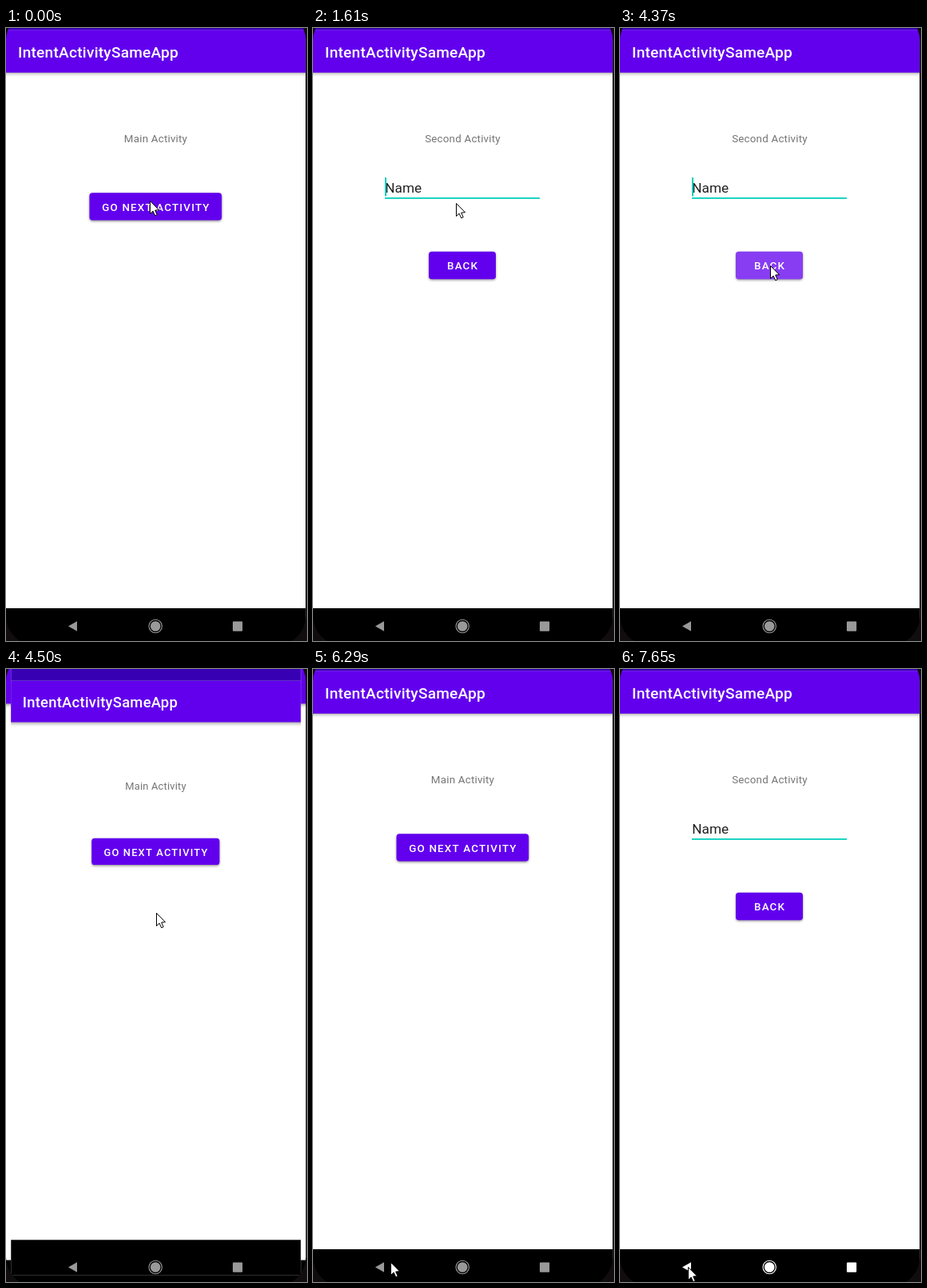
Animation, 377 px wide and 767 px high, one loop 8000 ms. Source, as an HTML page with a canvas:

```html
<!DOCTYPE html>
<html lang="en">
<head>
<meta charset="utf-8">
<title>Activity switch</title>
<style>
html, body { margin: 0; width: 100%; height: 100%; overflow: hidden; background: #000; }
canvas { display: block; }
</style>
</head>
<body>
<canvas id="stage" width="377" height="767"></canvas>
<script>
const ctx = document.getElementById('stage').getContext('2d');
const LOOP = 8000;
const PURPLE = '#6200ee';
const W = 375.5, TOP = -20.5, H = 792.5, CX = 187.4, CY = TOP + H / 2;

const MAIN = { label: 'Main Activity', button: { x: 104.5, y: 206.2, w: 165.7, text: 'GO NEXT ACTIVITY' } };
const SECOND = { label: 'Second Activity', field: true, button: { x: 145, y: 279.8, w: 84, text: 'BACK' } };

const PRESSES = [
  { screen: MAIN, start: 655, end: 1090, x: 180, y: 217 },
  { screen: SECOND, start: 3955, end: 4400, x: 188, y: 297 }
];
const SWITCHES = [
  { start: 1090, from: MAIN, to: SECOND },
  { start: 4400, from: SECOND, to: MAIN },
  { start: 7130, from: MAIN, to: SECOND, closing: true }
];

// time, x, y, eased
const POINTER = [
  [0, 180, 216], [199, 180, 216], [200, 180, 217], [1410, 180, 217], [1610, 179, 219],
  [2240, 182, 264], [3010, 188, 297], [4380, 188, 297], [4710, 187, 324, 1],
  [4915, 176, 313, 1], [5520, 176, 313], [6285, 97, 742, 1], [6360, 97, 742],
  [6625, 84, 744, 1], [6870, 84, 744], [6960, 85, 748, 1], [LOOP, 85, 748]
];

const clamp = v => Math.max(0, Math.min(1, v));
const ramp = (t, start, length) => clamp((t - start) / length);
const mix = (a, b, k) => a + (b - a) * k;
const smooth = k => k * k * (3 - 2 * k);

function cubic(p0, p1, p2, p3, u) {
  const v = 1 - u;
  return v * v * v * p0 + 3 * v * v * u * p1 + 3 * v * u * u * p2 + u * u * u * p3;
}

// Quick start with a very long settle
function settle(x) {
  const early = x < 1 / 6;
  const xs = early ? [0, 0.05, 0.1333, 1 / 6] : [1 / 6, 0.2083, 0.25, 1];
  const ys = early ? [0, 0, 0.06, 0.4] : [0.4, 0.82, 1, 1];
  let lo = 0, hi = 1;
  for (let i = 0; i < 24; i++) {
    const mid = (lo + hi) / 2;
    if (cubic(...xs, mid) < x) lo = mid; else hi = mid;
  }
  return cubic(...ys, lo);
}

function shadow(alpha, blur, dy) {
  ctx.shadowColor = `rgba(0,0,0,${alpha})`;
  ctx.shadowBlur = blur;
  ctx.shadowOffsetY = dy;
}

function text(str, x, y, size, color, weight = 400, spacing = 0, align = 'left') {
  ctx.font = `${weight} ${size}px Roboto, sans-serif`;
  ctx.letterSpacing = spacing + 'px';
  ctx.fillStyle = color;
  const left = align === 'center' ? x - (ctx.measureText(str).width - spacing) / 2 : x;
  ctx.fillText(str, left, y);
}

function rect(x, y, w, h, color) {
  ctx.fillStyle = color;
  ctx.fillRect(x, y, w, h);
}

function disc(x, y, r) {
  ctx.beginPath();
  ctx.arc(x, y, r, 0, Math.PI * 2);
}

function drawButton(screen, t, alpha) {
  const b = screen.button, h = 34.4, cx = b.x + b.w / 2, cy = b.y + h / 2;
  ctx.save();
  ctx.beginPath();
  ctx.roundRect(b.x, b.y, b.w, h, 3.8);
  ctx.save();
  shadow(0.42, 3, 1.3);
  ctx.fillStyle = PURPLE;
  ctx.fill();
  ctx.restore();
  const press = PRESSES.find(p => p.screen === screen && t >= p.start && t < p.end + 400);
  if (press) {
    ctx.save();
    ctx.clip();
    const k = 1 - (1 - ramp(t, press.start, 225)) ** 2;
    const fade = ramp(t, press.start, 75) * (1 - ramp(t, press.end, 150));
    ctx.globalAlpha = alpha * 0.24 * fade;
    ctx.fillStyle = '#fff';
    disc(mix(press.x, cx, k), mix(press.y, cy, k), mix(b.w * 0.18, Math.hypot(b.w, h) / 2 + 1, k));
    ctx.fill();
    ctx.restore();
  }
  text(b.text, cx, cy + 5.2, 13.38, '#fff', 500, 1.19, 'center');
  ctx.restore();
}

function caretOn(t) {
  if (t >= 7000) return t < 7635;
  return Math.floor((t - 3230) / 525) % 2 === 0;
}

function drawScreen(screen, t, scale = 1, alpha = 1) {
  if (alpha <= 0) return;
  ctx.save();
  ctx.globalAlpha = alpha;
  ctx.translate(CX, CY);
  ctx.scale(scale, scale);
  ctx.translate(-CX, -CY);
  rect(0, TOP, W, H, '#fff');
  ctx.save();
  ctx.beginPath();
  ctx.rect(0, TOP, W, H);
  ctx.clip();
  shadow(0.42, 4.5, 1.6);
  rect(-6, 2.2, W + 12, 53.6, PURPLE);
  ctx.restore();
  rect(0, TOP, W, 22.7, '#3700b3');
  text('IntentActivitySameApp', 15, 37, 19.1, '#fff', 500, 0.24);
  text(screen.label, CX, 143.4, 13.38, '#757575', 400, 0.2, 'center');
  if (screen.field) {
    text('Name', 90.3, 205.8, 17.2, '#212121');
    rect(90, 212, 194, 1.8, '#03cfbc');
    if (caretOn(t)) rect(90, 187, 2, 23.5, '#03cfbc');
  }
  drawButton(screen, t, alpha);
  rect(0, 726, W, 46, '#000');
  ctx.restore();
}

function drawWindows(t) {
  let current = MAIN;
  for (const s of SWITCHES) {
    if (t < s.start) break;
    const age = t - s.start, k = settle(clamp(age / 400)), fade = ramp(age, 50, 50);
    if (age >= 400) {
      current = s.to;
    } else if (s.closing) {
      drawScreen(s.to, t, mix(1.1, 1, k));
      drawScreen(s.from, t, mix(1, 0.9, k), 1 - fade);
      return;
    } else {
      drawScreen(s.from, t, mix(1, 1.05, k));
      drawScreen(s.to, t, mix(0.85, 1, k), fade);
      return;
    }
  }
  drawScreen(current, t);
}

function drawNav(t) {
  const glow = ramp(t, 6900, 80) * (1 - ramp(t, 7150, 350));
  if (glow > 0) {
    const k = smooth(ramp(t, 6880, 250)), w = mix(46, 76, k);
    ctx.fillStyle = `rgba(255,255,255,${0.2 * glow})`;
    ctx.beginPath();
    ctx.roundRect(84 - w / 2, 726, w, 46, 23);
    ctx.fill();
  }
  const level = Math.round(mix(153, 255, ramp(t, 6900, 250)));
  const color = `rgb(${level},${level},${level})`;
  ctx.fillStyle = ctx.strokeStyle = color;
  ctx.lineWidth = 1.1;
  ctx.beginPath();
  ctx.moveTo(78, 748.5);
  ctx.lineTo(89, 742.2);
  ctx.lineTo(89, 754.8);
  ctx.fill();
  disc(187.2, 748.5, 6.3);
  ctx.fill();
  disc(187.2, 748.5, 8.2);
  ctx.stroke();
  ctx.beginPath();
  ctx.roundRect(284, 742.5, 12.2, 12.2, 1);
  ctx.fill();
}

function drawBezel() {
  ctx.beginPath();
  ctx.rect(0, 0, 377, 767);
  ctx.roundRect(0, TOP, W, H, 36);
  ctx.fillStyle = '#110d0f';
  ctx.fill('evenodd');
}

function drawPointer(t) {
  const i = POINTER.findIndex(p => p[0] > t);
  const a = POINTER[i - 1], b = POINTER[i];
  let k = (t - a[0]) / (b[0] - a[0]);
  if (b[3]) k = smooth(k);
  ctx.save();
  ctx.translate(Math.round(mix(a[1], b[1], k)) + 0.5, Math.round(mix(a[2], b[2], k)) + 0.5);
  ctx.beginPath();
  const shape = [[0, 0], [0, 16], [3.6, 12.6], [6.2, 18.3], [8.7, 17.2], [6.2, 11.6], [11, 11.2]];
  for (const [x, y] of shape) ctx.lineTo(x, y);
  ctx.closePath();
  ctx.fillStyle = '#fff';
  ctx.fill();
  ctx.strokeStyle = '#000';
  ctx.lineWidth = 1;
  ctx.stroke();
  ctx.restore();
}

function draw(t) {
  ctx.clearRect(0, 0, 377, 767);
  drawWindows(t);
  drawNav(t);
  drawBezel();
  drawPointer(t);
}

const began = performance.now();
function tick() {
  draw((performance.now() - began) % LOOP);
  requestAnimationFrame(tick);
}
tick();
</script>
</body>
</html>
```
